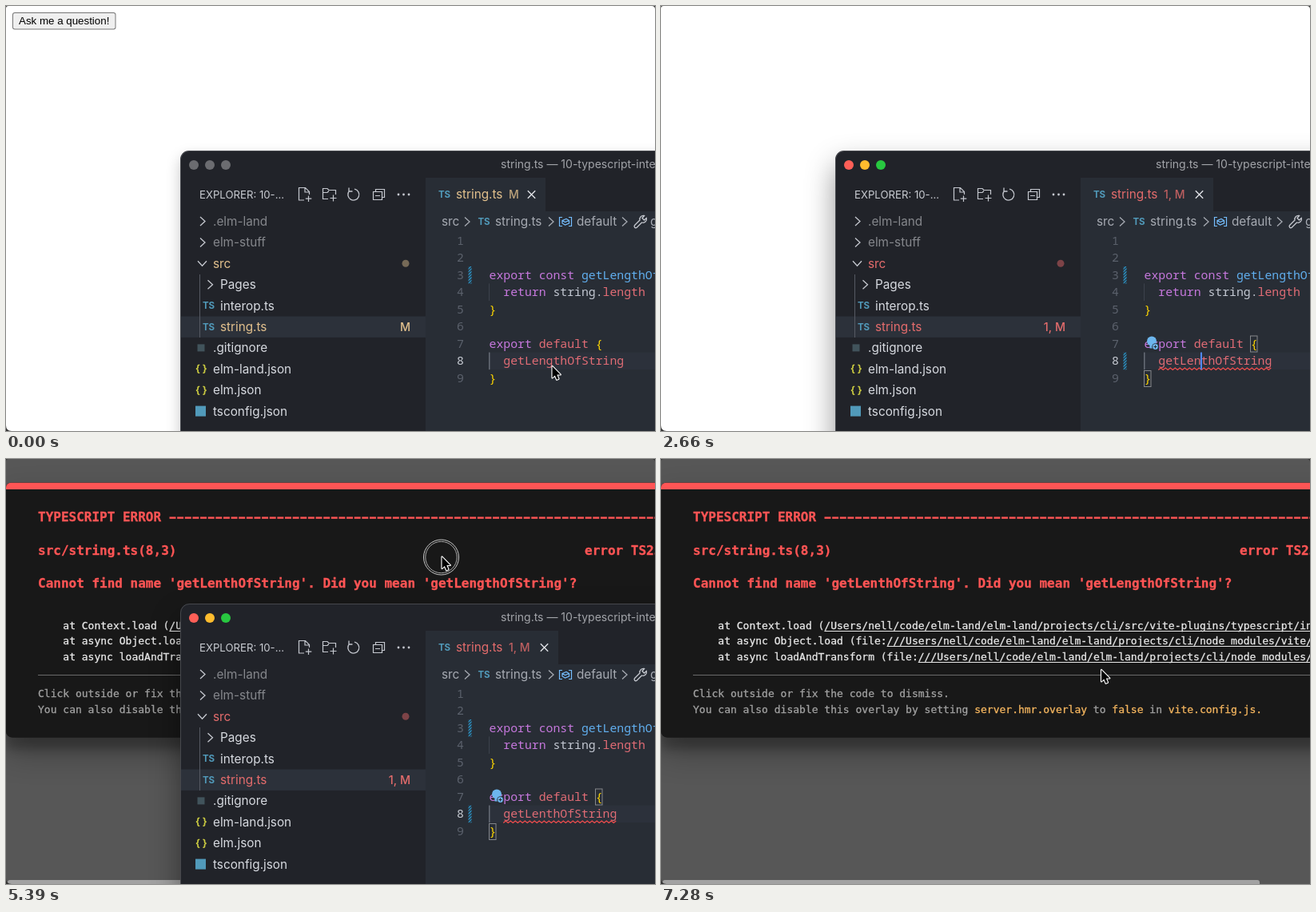
These frames come from a looping animation (812 px wide and 532 px high, 7840 ms). An HTML page with a canvas:

```html
<!DOCTYPE html>
<html lang="en">
<head>
<meta charset="utf-8">
<title>Type error overlay</title>
<style>
html, body { margin: 0; width: 100%; height: 100%; overflow: hidden; background: #fff; }
canvas { display: block; width: 812px; height: 532px; }
</style>
</head>
<body>
<canvas id="stage" width="812" height="532"></canvas>
<script>
const ctx = document.getElementById('stage').getContext('2d');
const W = 812, H = 532, LOOP = 7840, TICK = 70;

const C = {
  side: '#212329', editor: '#282d35', row: '#2c313a', text: '#d7dae0', dim: '#85878c',
  crumb: '#a6aab2', mod: '#e2c08d', err: '#e46c6c', ts: '#519aba', icon: '#c5c8cf',
  purple: '#c678dd', red: '#e06c75', blue: '#61afef', plain: '#c3c8d2', gold: '#ffd700',
  alert: '#ff5555', stack: '#e8e8e8', tip: '#a2a2a2', amber: '#f5b65f'
};
const ui = (size, weight = 400) => `${weight} ${size}px Inter, sans-serif`;
const menlo = (size, weight = 400) => `${weight} ${size}px "DejaVu Sans Mono", monospace`;
const CODE = '14.8px "Noto Sans Mono", monospace';
const CHAR = 8.88, CODE_X = 604.5;

// Times at which the caret toggles, starting with its first appearance.
const BLINKS = [350, 1050, 1540, 2030, 2450, 2940, 3430, 3990, 4480, 4970];

// Extra stroke that thickens light text on the dark overlay.
let heft = 0;

const ease = p => { p = Math.min(1, Math.max(0, p)); return p * p * (3 - 2 * p); };
const mix = (a, b, p) => a + (b - a) * p;
const lineY = n => 293.5 + 21.55 * (n - 1);
const rowY = i => 269.5 + 26.4 * i;

function text(str, x, y, color, font, align = 'left') {
  ctx.font = font;
  ctx.fillStyle = color;
  ctx.textAlign = align;
  ctx.fillText(str, x, y);
  if (heft) {
    ctx.strokeStyle = color;
    ctx.lineWidth = heft;
    ctx.strokeText(str, x, y);
  }
}

function rect(x, y, w, h, color) {
  ctx.fillStyle = color;
  ctx.fillRect(x, y, w, h);
}

function disc(x, y, r, color) {
  ctx.fillStyle = color;
  ctx.beginPath();
  ctx.arc(x, y, r, 0, 7);
  ctx.fill();
}

function ring(x, y, r, color, width = 1) {
  ctx.strokeStyle = color;
  ctx.lineWidth = width;
  ctx.beginPath();
  ctx.arc(x, y, r, 0, 7);
  ctx.stroke();
}

function path(d, color, width = 1.2, x = 0, y = 0) {
  ctx.save();
  ctx.translate(x, y);
  ctx.strokeStyle = color;
  ctx.lineWidth = width;
  ctx.stroke(new Path2D(d));
  ctx.restore();
}

function roundRect(x, y, w, h, r, color) {
  ctx.fillStyle = color;
  ctx.beginPath();
  ctx.roundRect(x, y, w, h, r);
  ctx.fill();
}

// Draws [string, colour] pairs one after another in a monospaced font.
function spans(parts, x, y, font, advance) {
  for (const [str, color, underline] of parts) {
    text(str, x, y, color, font);
    if (underline) rect(x, y + 2, str.length * advance, 1, color);
    x += str.length * advance;
  }
}

const chevron = (x, y, color) => path('M-3 -5.5L3 0L-3 5.5', color, 1.3, x, y);
const chevronDown = (x, y, color) => path('M-5.5 -3L0 3L5.5 -3', color, 1.3, x, y);

function drawButton() {
  roundRect(8, 8, 129.5, 21.5, 3, '#767676');
  roundRect(9, 9, 127.5, 19.5, 2, '#efefef');
  text('Ask me a question!', 16, 23, '#000', '13.333px "Liberation Sans", sans-serif');
}

function panelShadow(dy, blur, alpha) {
  ctx.save();
  ctx.shadowColor = `rgba(0,0,0,${alpha})`;
  ctx.shadowBlur = blur;
  ctx.shadowOffsetY = dy;
  roundRect(0, 29.7, W + 60, 318.8, [6, 6, 8, 8], '#181818');
  ctx.restore();
}

function drawOverlay() {
  rect(0, 0, W, H, '#575757');
  panelShadow(19, 38, 0.3);
  panelShadow(15, 12, 0.22);
  roundRect(0, 29.7, W + 60, 8.2, [6, 6, 0, 0], C.alert);

  const bold = menlo(16, 700), small = menlo(13), adv = 7.826;
  heft = 0.3;
  text('TYPESCRIPT ERROR', 40, 78, C.alert, bold);
  for (let x = 204.5; x < W; x += 9.632) rect(x, 72.4, 8, 2.4, C.alert);
  text('src/string.ts(8,3)', 40, 120, C.alert, bold);
  text('error TS2552', 724, 120, C.alert, bold);
  text("Cannot find name 'getLenthOfString'. Did you mean 'getLengthOfString'?", 40, 161, C.alert, bold);

  const home = '/Users/nell/code/elm-land/elm-land/projects/cli/';
  [
    ['at Context.load (', home + 'src/vite-plugins/typescript/index.js'],
    ['at async Object.load (file:', '//' + home + 'node_modules/vite/dist/node'],
    ['at async loadAndTransform (file:', '//' + home + 'node_modules/vite/dist']
  ].forEach(([call, link], i) => spans(
    [[call, C.stack], [link, C.stack, true]], 40 + 4 * adv, [213, 232, 252][i], small, adv));

  path('M40 270.5H812', '#6a6a6a', 1);
  text('Click outside or fix the code to dismiss.', 40, 298, C.tip, small);
  spans([
    ['You can also disable this overlay by setting ', C.tip], ['server.hmr.overlay', C.amber],
    [' to ', C.tip], ['false', C.amber], [' in ', C.tip], ['vite.config.js.', C.amber]
  ], 40, 318, small, adv);
  heft = 0;
  roundRect(2, 527, 747, 8, 3, '#a2a2a2');
}

function drawFrame(s) {
  ctx.save();
  ctx.shadowColor = s.focused ? 'rgba(0,0,0,.42)' : 'rgba(0,0,0,.22)';
  ctx.shadowBlur = s.focused ? 36 : 18;
  ctx.shadowOffsetY = s.focused ? 18 : 8;
  roundRect(218, 181, 900, 700, 11, C.side);
  ctx.restore();
  ctx.strokeStyle = 'rgba(255,255,255,.17)';
  ctx.lineWidth = 1;
  ctx.beginPath();
  ctx.roundRect(218.5, 181.5, 900, 700, 11);
  ctx.stroke();

  ['#ff5f57', '#febc2e', '#28c840'].forEach((color, i) =>
    disc(235 + 20 * i, 199, 6, s.focused ? color : '#6b6c70'));
  if (s.dirty) disc(235, 199, 2, '#7a0c08');
  text('string.ts — 10-typescript-interop', 619, 203, '#a2a4a9', ui(14));
}

function drawToolbar() {
  text('EXPLORER: 10-...', 242, 240.7, '#c9ccd2', ui(13.2));
  path('M373 243H366.500V227.500H374.500L379.500 232.500V236M374 227.500V233H379.500M378.500 237.500V245M374.800 241.200H382.300', C.icon);
  path('M403 241.500H396.500V228.500H402L404 230.500H412.500V236M396.500 233.500H402L404 231.500M409.500 236.500V244.500M405.500 240.500H413.500', C.icon);
  path('M429.500 231.500A7 7 0 1 0 436 229.200M429 227.500V232H433.500', C.icon, 1.3);
  path('M462.500 232V229.500H473.500V239.500H471M459.500 232.500H470.500V242.500H459.500ZM462 237.500H468', C.icon);
  for (const x of [491, 497.5, 504]) disc(x, 236, 1.4, C.icon);
}

function drawSidebar(s) {
  const status = s.error ? C.err : C.mod;
  drawToolbar();
  rect(219, 388.5, 306, 26.4, C.row);
  rect(242, 336, 1, 79, '#565a63');

  const rows = [
    ['.elm-land', 259, C.dim], ['elm-stuff', 259, C.dim], ['src', 259, status],
    ['Pages', 268, C.text], ['interop.ts', 268, C.text], ['string.ts', 268, status],
    ['.gitignore', 259, C.text], ['elm-land.json', 259, C.text],
    ['elm.json', 259, C.text], ['tsconfig.json', 259, C.text]
  ];
  rows.forEach(([name, x, color], i) => text(name, x, rowY(i) + 5.5, color, ui(15.3)));

  chevron(246, rowY(0), C.icon);
  chevron(246, rowY(1), C.icon);
  chevronDown(245.5, rowY(2), C.icon);
  chevron(255.5, rowY(3), C.icon);
  for (const i of [4, 5]) text('TS', 246, rowY(i) + 4.2, C.ts, ui(11.5, 700));
  rect(239.5, rowY(6) - 4.5, 9, 9, '#41535b');
  for (const i of [7, 8]) text('{ }', 237, rowY(i) + 4, '#cbcb41', ui(12.5, 700));
  rect(237, rowY(9) - 6.5, 13, 13, C.ts);

  disc(500, rowY(2), 4.5, s.error ? '#7d4347' : '#766a57');
  text(s.error ? '1, M' : 'M', 506, rowY(5) + 5, status, ui(14.3, 500), 'right');
}

function drawTab(s) {
  const end = s.error ? 691 : 675, color = s.error ? C.err : C.mod;
  rect(525, 215, end - 525, 42, C.editor);
  rect(525, 257, W - 525, H - 257, C.editor);
  text('TS', 541, 240, C.ts, ui(11.5, 700));
  text('string.ts', 563, 241, color, ui(15.3));
  ctx.globalAlpha = 0.8;
  text(s.error ? '1, M' : 'M', 629, 241, color, ui(14, 500));
  ctx.globalAlpha = 1;
  if (s.dirty) disc(658, 236, 5, '#e8eaee');
  else path('M-4.700 -4.700L4.700 4.700M4.700 -4.700L-4.700 4.700', '#dfe1e6', 1.4, end - 17.5, 236);
}

function drawCrumbs() {
  const font = ui(15.3), y = 275;
  text('src', 545, y, C.crumb, font);
  text('TS', 590.5, 274, C.ts, ui(11.5, 700));
  text('string.ts', 612, y, C.crumb, font);
  text('default', 714, y, C.crumb, font);
  text('g', 806, y, C.crumb, font);
  for (const x of [577, 682, 774]) chevron(x, 270, C.crumb);
  path('M696 264.500H692.500V275.500H696M704 264.500H707.500V275.500H704M696 268.500L701 266.500L704.500 268.500V272L699.500 274L696 272ZM696 268.500L699.500 270.500L704.500 268.500', '#75beff', 1.2);
  path('M786.500 274.500L793 268A4.500 4.500 0 0 1 798.500 262.500L796 265.500L798.500 268L801.300 265.500A4.500 4.500 0 0 1 795.500 271L789 277.500A2 2 0 0 1 786.500 274.500Z', C.icon, 1.3);
}

function drawHatch(n) {
  const y = lineY(n) - 10.5;
  ctx.save();
  ctx.beginPath();
  ctx.rect(578.5, y, 4, 21.5);
  ctx.clip();
  for (let d = -4; d < 26; d += 3.6) path('M0 4L5 -1', '#2b8fc0', 1.5, 578, y + d);
  ctx.restore();
}

function drawCode(s) {
  const word = s.edited ? 'getLenthOfString' : 'getLengthOfString';
  const indent = CODE_X + 2 * CHAR, y8 = lineY(8);
  rect(604, y8 - 10.8, W - 604, 21.6, '#2c313b');
  rect(604, lineY(4) - 10.8, 1, 21.6, '#3c424c');
  rect(604, y8 - 10.8, 1.5, 21.6, '#666c76');

  if (s.marked) {
    rect(CODE_X + 13 * CHAR, lineY(3) - 10.5, 100, 21, '#12456b');
    rect(indent, y8 - 10.5, word.length * CHAR, 21, '#12456b');
  }
  if (s.caretSet) {
    ctx.strokeStyle = '#85888c';
    ctx.lineWidth = 1;
    ctx.strokeRect(737.5, 413, 8.5, 20);
    ctx.strokeRect(604.5, 456.5, 8.5, 20);
  }

  for (let n = 1; n < 10; n++) {
    text(String(n), 573, lineY(n) + 5, n === 8 ? '#c8ccd4' : '#5b616c', CODE, 'right');
  }
  drawHatch(3);
  if (s.gutter) drawHatch(8);

  const code = (n, x, parts) => spans(parts, x, lineY(n) + 5, CODE, CHAR);
  code(3, CODE_X, [['export const ', C.purple], ['getLengthOfString', C.blue]]);
  code(4, indent, [['return ', C.purple], ['string.', C.plain], ['length', C.red]]);
  code(5, CODE_X, [['}', C.gold]]);
  code(7, CODE_X, [['export ', C.purple], ['default ', C.red], ['{', C.gold]]);
  code(8, indent, [[word, C.red]]);
  code(9, CODE_X, [['}', C.gold]]);

  if (s.squiggle) {
    let d = `M${indent} 455.500`;
    for (let x = indent, up = true; x < 762; x += 3, up = !up) d += `l3 ${up ? -2.5 : 2.5}`;
    path(d, '#f14c4c', 1.2);
  }
  if (s.bulb) {
    disc(614, 419.5, 6, '#6db6ee');
    rect(611.5, 424, 5, 4.5, '#6db6ee');
    disc(618.5, 426.5, 4.3, C.editor);
    disc(618.5, 426.5, 3.4, '#6db6ee');
    path('M616.500 426.500H620.500M618.500 424.500V428.500', C.editor, 1);
  }
  if (s.caret) rect(indent + (s.edited ? 6 : 7) * CHAR - 0.6, y8 - 10.8, 2, 21.6, '#528bff');
}

function drawWindow(s) {
  drawFrame(s);
  drawSidebar(s);
  drawTab(s);
  drawCrumbs();
  drawCode(s);
}

function drawArrow(x, y) {
  const shape = new Path2D('M0 0V14.500L3.300 11.500L5.600 16.800L8 15.700L5.800 10.500H10.300Z');
  ctx.save();
  ctx.translate(x, y);
  ctx.lineJoin = 'round';
  ctx.strokeStyle = '#fff';
  ctx.lineWidth = 2.2;
  ctx.stroke(shape);
  ctx.fillStyle = '#000';
  ctx.fill(shape);
  ctx.restore();
}

function drawBeam(x, y) {
  const d = 'M-3.500 -8Q0 -8 0 -6Q0 -8 3.500 -8M0 -6V6M-3.500 8Q0 8 0 6Q0 8 3.500 8M-2 2H2';
  path(d, '#fff', 2.6, x, y);
  path(d, '#111', 1.1, x, y);
}

function drawPointer(t) {
  if (t >= 630 && t < 3080) return;
  const up = ease((t - 3010) / 420), down = ease((t - 6790) / 490);
  const x = mix(mix(683.5, 545.5, up), 551, down);
  const y = mix(mix(451, 122.5, up), 264, down);
  const overCode = t >= 210 && t < 3780 && y > 257;
  if (overCode) drawBeam(x, y);
  else drawArrow(x, y);
}

function drawCorners() {
  ctx.fillStyle = '#333';
  ctx.fill(new Path2D('M0 0H3Q0 0 0 3ZM812 0V4Q812 0 808 0ZM0 532V525Q0 532 7 532Z'));
}

function draw(t) {
  const state = {
    focused: t >= 140,
    caretSet: t >= 350,
    marked: t >= 350 && t < 1050,
    edited: t >= 630,
    dirty: t >= 700 && t < 1820,
    gutter: t >= 1120,
    squiggle: t >= 1680,
    error: t >= 2100,
    bulb: t >= 2380,
    caret: BLINKS.filter(at => t >= at).length % 2 === 1
  };
  rect(0, 0, W, H, '#fff');
  if (t < 2660) drawButton();
  if (t >= 3780) drawOverlay();
  if (t < 5460) drawWindow(state);
  if (t >= 5390 && t < 5740) {
    ring(544.5, 123, 22, '#c8c8c8');
    ring(544.5, 123, 19.7, '#a8a8a8');
  }
  drawPointer(t);
  drawCorners();
}

function loop() {
  const t = performance.now() % LOOP;
  draw(Math.floor(t / TICK) * TICK);
  requestAnimationFrame(loop);
}
loop();
</script>
</body>
</html>
```
